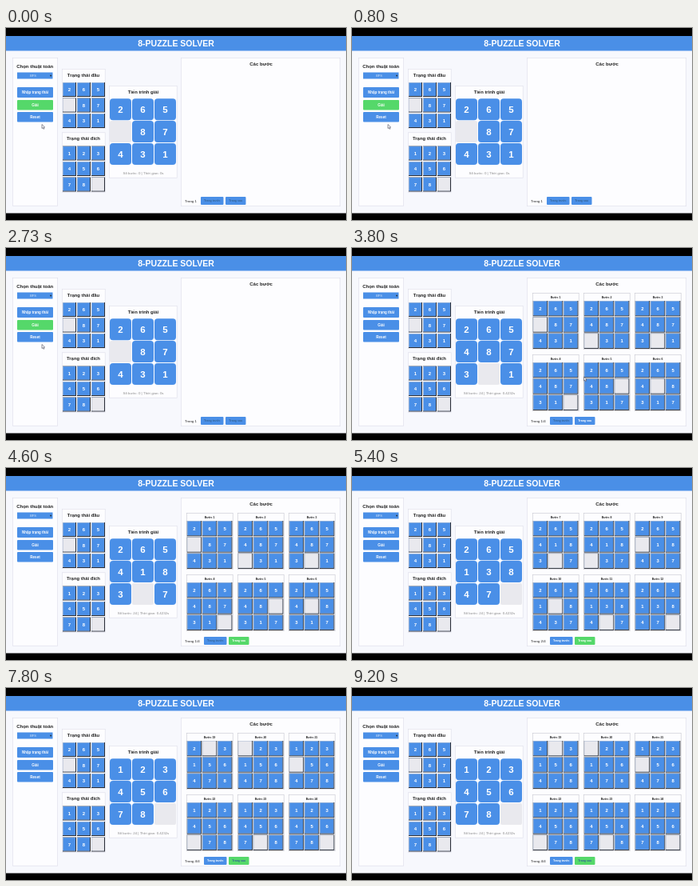
Animation, 426 px wide and 240 px high, one loop 9270 ms. Source, as an HTML page with a canvas:

```html
<!DOCTYPE html>
<html lang="vi">
<head>
<meta charset="utf-8">
<title>8-Puzzle Solver</title>
<style>
html, body { margin: 0; width: 100%; height: 100%; overflow: hidden; background: #000; }
canvas { display: block; width: 426px; height: 240px; }
</style>
</head>
<body>
<canvas id="stage"></canvas>
<script>
const W = 426, H = 240, LOOP = 9270;
const BLUE = '#4a8fe7', GREEN = '#55d86a', INK = '#222', DISABLED = '#356496', EMPTY = '#e9e9ee';
const SOLVED_AT = 3130, STEP_MS = 185;
const PAGE_CLICKS = [4900, 6050, 7100];
const PER_PAGE = 6;

const canvas = document.getElementById('stage');
const dpr = window.devicePixelRatio || 1;
canvas.width = W * dpr;
canvas.height = H * dpr;
const ctx = canvas.getContext('2d');
ctx.scale(dpr, dpr);

// Every board follows from the start state and the path of the empty cell.
const states = solve('265087431', '367854763478521452103678');
const GOAL = states[states.length - 1];

function solve(start, emptyPath) {
  const cells = [...start];
  return [...emptyPath].map(next => {
    const empty = cells.indexOf('0');
    [cells[empty], cells[next]] = [cells[next], cells[empty]];
    return cells.join('');
  });
}

function rect(x, y, w, h, color) {
  ctx.fillStyle = color;
  ctx.fillRect(x, y, w, h);
}

function rounded(x, y, w, h, r, color) {
  ctx.fillStyle = color;
  ctx.beginPath();
  ctx.roundRect(x, y, w, h, r);
  ctx.fill();
}

function text(str, x, y, size, color = INK, weight = 'bold', align = 'center') {
  ctx.font = `${weight} ${size}px "Liberation Sans", Arial, sans-serif`;
  ctx.textAlign = align;
  ctx.fillStyle = color;
  ctx.fillText(str, x, y + size * 0.36);
}

function panel(x, y, w, h, border = '#dddde9') {
  rect(x, y, w, h, border);
  rect(x + 0.6, y + 0.6, w - 1.2, h - 1.2, '#fdfdff');
}

function button(label, x, y, w, h, size, fill = BLUE, color = '#fff') {
  rounded(x, y, w, h, 1, fill);
  text(label, x + w / 2, y + h / 2, size, color);
}

function bevelTile(digit, x, y, w, h) {
  rect(x, y, w, h, '#2b2f38');
  rect(x, y, w - 1, h - 1, '#b4c0d4');
  rect(x + 0.6, y + 0.6, w - 1.7, h - 1.7, digit === '0' ? EMPTY : BLUE);
  if (digit !== '0') text(digit, x + w / 2, y + h / 2, 6, '#fff');
}

function flatTile(digit, x, y, w, h) {
  rounded(x, y, w, h, digit === '0' ? 2 : 4, digit === '0' ? EMPTY : BLUE);
  if (digit !== '0') text(digit, x + w / 2, y + h / 2, 11.5, '#fff');
}

function board(state, x, y, pitchX, pitchY, w, h, tile) {
  [...state].forEach((digit, i) =>
    tile(digit, x + (i % 3) * pitchX, y + Math.floor(i / 3) * pitchY, w, h));
}

function stateBox(title, state, y) {
  panel(70, y, 54.5, 75);
  text(title, 97, y + 7.5, 5.9);
  board(state, 71, y + 17, 18, 19.5, 17, 18, bevelTile);
}

function stepCard(index, slot) {
  const x = 226 + (slot % 3) * 64, y = 56 + Math.floor(slot / 3) * 77;
  panel(x, y, 58.5, 71, '#c8c8d0');
  text('Bước ' + (index + 1), x + 29, y + 5.3, 3.6);
  board(states[index], x + 0.8, y + 10, 19.1, 20.3, 18.4, 19.3, bevelTile);
}

function pager(t, page, solved) {
  const x = solved ? 248 : 244;
  const canGoBack = page > 0;
  const canGoOn = solved && page < 3;
  text('Trang ' + (page + 1) + (solved ? '/4' : ''), 224, 216, 4.4, INK, 'normal', 'left');
  button('Trang trước', x, 211, 28.5, 10, 3.6, BLUE, canGoBack ? '#fff' : DISABLED);
  button('Trang sau', x + 31, 211, 25.5, 10, 3.6, t > 4250 ? GREEN : BLUE, canGoOn ? '#fff' : DISABLED);
}

function glide(from, to, p) {
  const e = p * p * (3 - 2 * p);
  return from.map((v, i) => v + (to[i] - v) * e);
}

function pointer(t) {
  const rest = [45, 120.5], middle = [290.5, 161], away = [372, 276];
  const [x, y] = t < 3800
    ? glide(rest, middle, Math.max(0, (t - 3200) / 600))
    : glide(middle, away, Math.min(1, (t - 3800) / 500));
  ctx.beginPath();
  [[0, 0], [0, 5], [1.2, 4], [2.1, 5.8], [3, 5.3], [2.2, 3.6], [3.6, 3.5]]
    .forEach(([dx, dy]) => ctx.lineTo(x + dx, y + dy));
  ctx.closePath();
  ctx.fillStyle = '#fff';
  ctx.fill();
  ctx.strokeStyle = '#445';
  ctx.lineWidth = 0.6;
  ctx.stroke();
}

function draw(t) {
  const solved = t >= SOLVED_AT;
  const step = Math.min(states.length - 1, Math.max(0, Math.floor((t - SOLVED_AT) / STEP_MS) - 1));
  const page = PAGE_CLICKS.filter(click => t >= click).length;

  rect(0, 0, W, H, '#000');
  rect(0, 10, W, 221.5, '#f7f8fd');
  rect(0, 10, W, 18.5, BLUE);
  text('8-PUZZLE SOLVER', 213, 19.5, 10.5, '#fff');

  panel(8, 37, 57, 185.5);
  text('Chọn thuật toán', 36.2, 47.5, 6);
  rect(14, 55.5, 44.5, 8, BLUE);
  text('BFS', 34, 59.5, 3.8, '#e4edfa', 'normal');
  text('▾', 56, 59.3, 4, INK);
  button('Nhập trạng thái', 14, 74, 45, 13, 4.5);
  button('Giải', 14, 90, 45, 12.5, 4.5, t < 3270 ? GREEN : BLUE);
  button('Reset', 14, 105, 45, 12.5, 4.5);

  stateBox('Trạng thái đầu', states[0], 51);
  stateBox('Trạng thái đích', GOAL, 130.5);

  panel(129, 72, 85.5, 115.5);
  text('Tiến trình giải', 172, 79.5, 5.9);
  board(states[step], 130, 88.3, 28, 27.8, 27, 27, flatTile);
  text(solved ? 'Số bước: 24 | Thời gian: 0.4232s' : 'Số bước: 0 | Thời gian: 0s',
    172, 181, 4.4, '#888', 'normal');

  panel(219, 37, 200, 186);
  text('Các bước', 319.5, 44.7, 6.1);
  if (solved) for (let slot = 0; slot < PER_PAGE; slot++) stepCard(page * PER_PAGE + slot, slot);
  pager(t, page, solved);

  pointer(t);
}

function frame() {
  draw(performance.now() % LOOP);
  requestAnimationFrame(frame);
}
frame();
</script>
</body>
</html>
```
